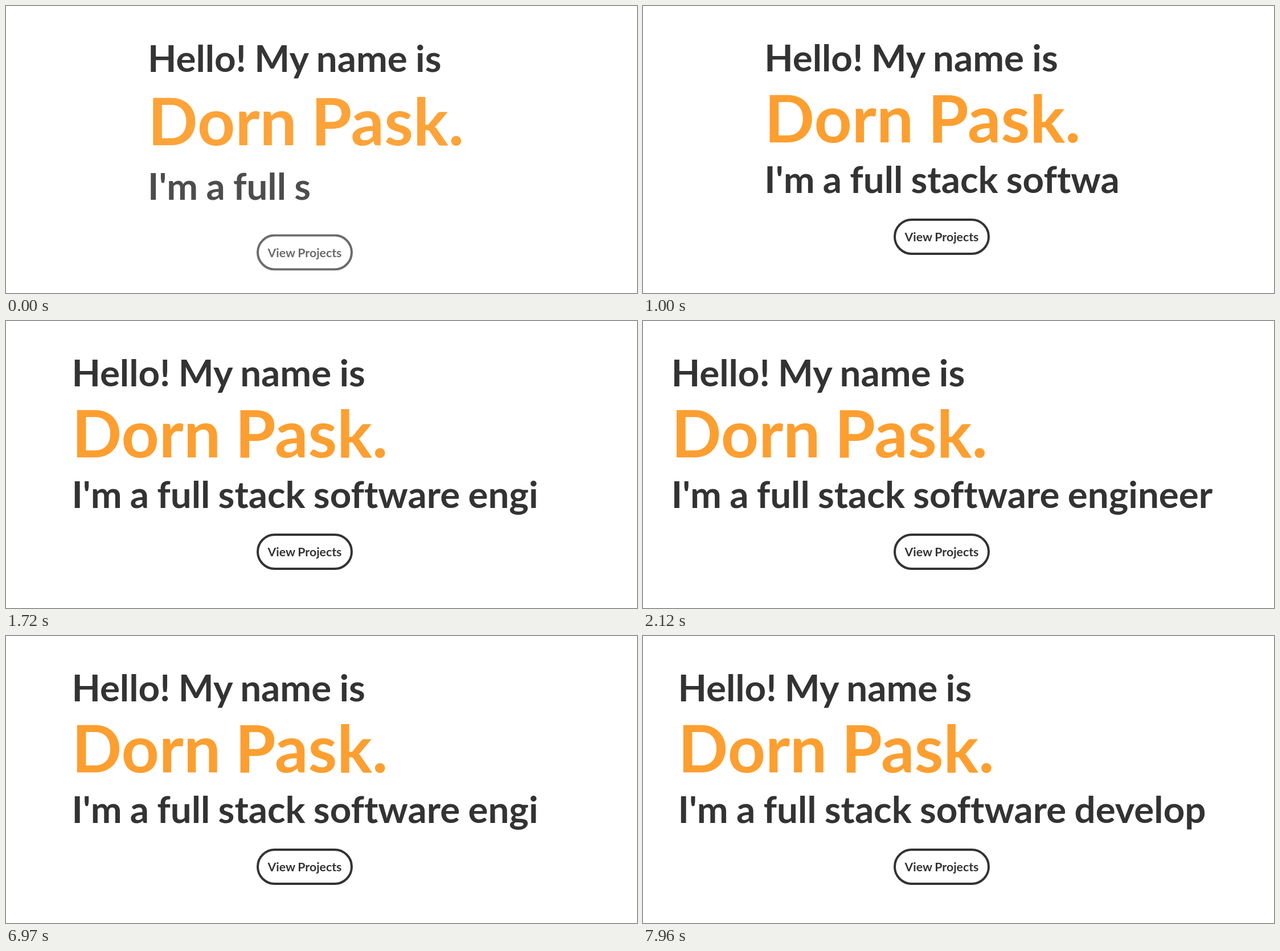
An HTML page for the animation above (8000 ms loop, 1108 by 505 pixels).

```html
<!DOCTYPE html>
<html lang="en">
<head>
<meta charset="utf-8">
<title>Intro</title>
<style>
  html, body { margin: 0; width: 100%; height: 100%; overflow: hidden; background: #fff; }
  svg { display: block; width: 1108px; height: 505px; }
  text {
    font: 700 65.5px Lato, sans-serif;
    font-variant-ligatures: none;
    word-spacing: -.025em;
    fill: #333;
  }
  #name { font-size: 115.5px; fill: #fd9f30; }
  #button text { font-size: 21.3px; text-anchor: middle; }
  #button rect { fill: #fff; stroke: #333; stroke-width: 4px; }
</style>
</head>
<body>
<svg viewBox="0 0 1108 505">
  <g id="intro">
    <text class="rise" y="115.3">Hello! My name is</text>
    <text class="rise" id="name" y="240.2">Dorn Pask.</text>
    <text class="rise" id="role" y="328.6"></text>
  </g>
  <g class="rise" id="button">
    <rect x="442" y="376" width="165" height="60" rx="30"/>
    <text x="524.5" y="414">View Projects</text>
  </g>
</svg>
<script>
  const LOOP = 8000, CENTER = 525, MIN_WIDTH = 552;
  const START = "I'm a full s";
  const STEM = "I'm a full stack software ";
  const FIRST = STEM + "engineer";
  const SECOND = STEM + "developer";
  const ERASE_AT = 6630, RETYPE_AT = 7310;

  const intro = document.getElementById("intro");
  const role = document.getElementById("role");

  // Number of keys pressed by t, each pause `drag` longer than the one before
  function pressed(t, start, step, drag, max) {
    let n = 0;
    for (let next = start; n < max && next <= t; n++) next += step + drag * n;
    return n;
  }

  function roleAt(t) {
    if (t >= RETYPE_AT) {
      return SECOND.slice(0, STEM.length + pressed(t, RETYPE_AT, 108, 0, 9));
    }
    const typed = pressed(t, 70, 86.5, 1, FIRST.length - START.length);
    const erased = pressed(t, ERASE_AT, 86.5, 1, FIRST.length - STEM.length);
    return FIRST.slice(0, START.length + typed - erased);
  }

  // Staggered fade-up, already under way when the loop begins
  const rises = [...document.querySelectorAll(".rise")].map((el, i) => {
    const anim = el.animate(
      [{ opacity: 0, transform: "translateY(100px)" }, { opacity: 1, transform: "translateY(0px)" }],
      { duration: 1000, easing: "ease", fill: "both" });
    anim.pause();
    return { anim, lead: 880 - 150 * i };
  });

  function render(t) {
    for (const { anim, lead } of rises) anim.currentTime = Math.min(t + lead, 1000);
    const text = roleAt(t).trimEnd();
    if (text !== role.textContent) {
      role.textContent = text;
      const width = Math.max(MIN_WIDTH, role.getComputedTextLength());
      intro.setAttribute("transform", `translate(${CENTER - width / 2} 0)`);
    }
  }

  const start = performance.now();
  function tick() {
    render((performance.now() - start) % LOOP);
    requestAnimationFrame(tick);
  }
  tick();
</script>
</body>
</html>
```
